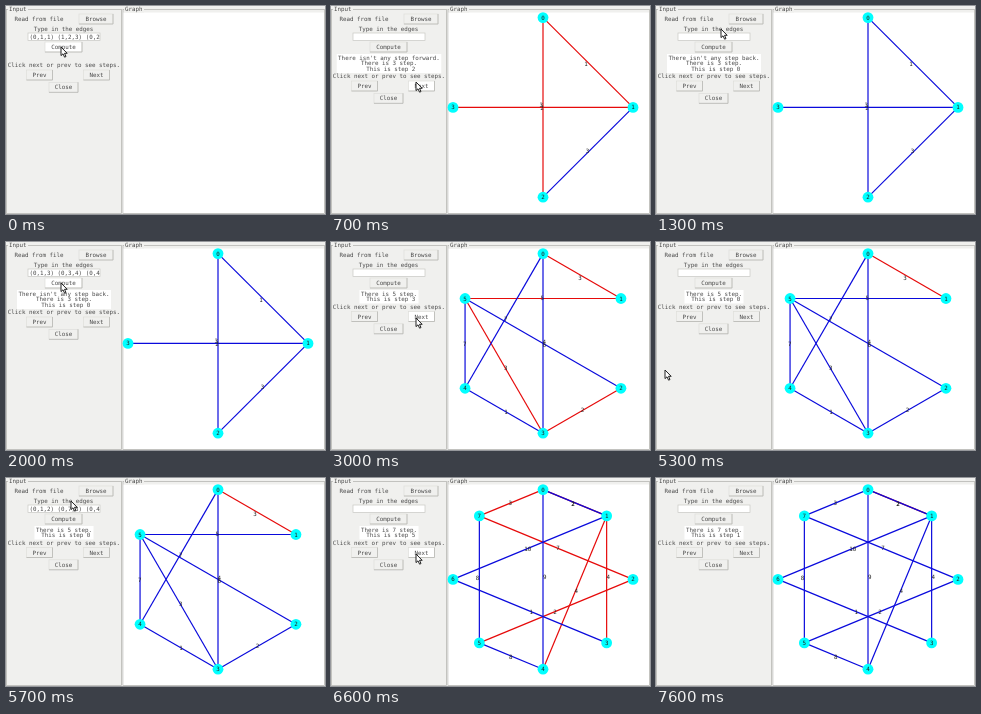
Write an HTML page that moves like this. It is 319 px wide and 208 px high and loops after 8100 ms.

```html
<!DOCTYPE html>
<html lang="en">
<head>
<meta charset="utf-8">
<title>Spanning tree steps</title>
<style>
html, body { margin: 0; width: 100%; height: 100%; overflow: hidden; background: #f0f0ee; }
svg { display: block; width: 319px; height: 208px; }
text { font: 5.83px "DejaVu Sans Mono", monospace; fill: #484848; text-anchor: middle; text-rendering: geometricPrecision; white-space: pre; }
.left { text-anchor: start; }
.graph text { fill: #222; }
</style>
</head>
<body>
<svg id="stage" viewBox="0 0 319 208"></svg>
<script>
const TICK = 100, TICKS = 81;
const stage = document.getElementById('stage');

// Edges as "from to : weight", those of the tree first, in step order.
// The last graph holds 0-1 twice, so its first step stays hidden.
const graphs = [
  { nodes: 4, steps: 3, typed: '(0,1,1) (1,2,3) (0,2', edges: '01:1 02:2 31:3 12:3' },
  { nodes: 6, steps: 5, typed: '(0,1,3) (0,3,4) (0,4',
    edges: '01:3 15:5 53:3 32:2 43:1 03:4 04:7 52:6 54:7' },
  { nodes: 8, steps: 7, typed: '(0,1,2) (0,7,3) (0,4',
    edges: '01:2 07:3 72:7 25:2 14:4 13:4 63:1 01:2 04:9 16:10 75:8 54:8' }
];

const spots = {
  compute: [55, 41], next: [85, 76], prev: [34, 76],
  entry: [65, 23], away: [9, 128], gone: [-30, 140]
};

// Where the pointer rests, from tick to tick, and how often it acts there.
const script = [
  ['compute', 0, 1, 1], ['next', 4, 7, 4], ['prev', 9, 12, 4],
  ['entry', 13, 18, 1], ['compute', 20, 21, 1], ['next', 24, 33, 6], ['prev', 36.5, 42, 6],
  ['next', 45, 46, 1], ['away', 53, 53, 0], ['gone', 55, 55, 0],
  ['entry', 57, 57, 1], ['compute', 58, 58, 1], ['next', 60.5, 68, 8], ['prev', 70.5, 75.5, 6],
  ['gone', 76, TICKS, 0]
];

const actions = {
  entry: s => { s.typed = graphs[s.graph + 1].typed; },
  compute: s => Object.assign(s, { graph: s.graph + 1, typed: '', red: 0, step: 0, note: '' }),
  next: s => {
    const more = s.red < graphs[s.graph].steps;
    s.note = more ? '' : "There isn't any step forward.";
    if (more) s.step = s.red++;
  },
  prev: s => {
    s.note = s.red ? '' : "There isn't any step back.";
    s.step = s.red = Math.max(0, s.red - 1);
  }
};

function stateAt(tick) {
  const state = { graph: -1, typed: graphs[0].typed, red: 0, step: 0, note: '' };
  for (const [spot, from, to, count] of script)
    for (let i = 0; i < count; i++) {
      const when = count > 1 ? from + (to - from) * i / (count - 1) : to;
      if (Math.ceil(when) <= tick) actions[spot](state);
    }
  return state;
}

function pointerAt(tick) {
  const i = script.findIndex(row => row[2] >= tick);
  const [spot, from] = script[i];
  if (tick >= from) return spots[spot];
  const [last, , left] = script[i - 1];
  const k = (tick - left) / (from - left);
  return spots[last].map((v, axis) => v + (spots[spot][axis] - v) * k);
}

const text = (x, y, s, left) => `<text x="${x}" y="${y + 2}"${left ? ' class="left"' : ''}>${s}</text>`;
const box = (x, y, w, h, fill, stroke = 'none') =>
  `<rect x="${x}" y="${y}" width="${w}" height="${h}" fill="${fill}" stroke="${stroke}" stroke-width=".7"/>`;

function button(label, cx, cy, w, [px, py]) {
  const x = cx - w / 2, y = cy - 5;
  const over = px > x && px < x + w && py > y && py < y + 10;
  return box(x, y, w, 10, over ? '#fff' : '#f0f0ee', '#dededa') +
    `<path d="M${x} ${y + 10}h${w}v-10" fill="none" stroke="#b8b8b4" stroke-width=".8"/>` +
    text(cx, cy, label);
}

function drawGraph({ nodes, edges }, red) {
  const points = Array.from({ length: nodes }, (_, i) => {
    const a = 2 * Math.PI * i / nodes;
    return [212 + 90 * Math.sin(a), 101.4 - 89.8 * Math.cos(a)];
  });
  let lines = '', labels = '';
  edges.split(' ').forEach((edge, i) => {
    const [ends, weight] = edge.split(':');
    const [[x1, y1], [x2, y2]] = [...ends].map(n => points[n]);
    const color = i < red ? '#e60a0a' : '#0a0adc';
    lines += `<path d="M${x1} ${y1}L${x2} ${y2}" stroke="${color}" stroke-width="1.2"/>`;
    // Weights sit loosely around the middle of their edge.
    labels += text((x1 + x2) / 2 + 2 * Math.sin(5 * ends), (y1 + y2) / 2 + 2 * Math.cos(7 * ends), weight);
  });
  const dots = points.map(([x, y], i) =>
    `<circle cx="${x}" cy="${y}" r="5.4" fill="#0ff"/>` + text(x, y, i)).join('');
  return `<g class="graph">${lines}${dots}${labels}</g>`;
}

function drawPanel({ typed, graph, step, note }, pointer) {
  const lines = graph < 0 ? [] : [`There is ${graphs[graph].steps} step.`, `This is step ${step}`];
  if (note) lines.unshift(note);
  const hintY = 59 + 5.5 * Math.max(0, lines.length - 1);
  const w = note ? note.length * 3.5 + 3 : 59;
  return text(33, 13, 'Read from file') + button('Browse', 90, 13, 34, pointer) +
    text(57.5, 23, 'Type in the edges') +
    box(22, 27, 72, 7.5, '#fff', '#c8c8c4') + text(23.5, 31, typed, true) +
    button('Compute', 57.5, 41, 37, pointer) +
    (lines.length ? box(58 - w / 2, 48, w, lines.length * 5.5 + 2.5, '#fff') : '') +
    lines.map((s, i) => text(s.startsWith('This') ? 59.7 : 58, 51.5 + 5.5 * i, s)).join('') +
    text(58, hintY, 'Click next or prev to see steps.') +
    button('Prev', 33.5, hintY + 10, 26, pointer) +
    button('Next', 90.5, hintY + 10, 26, pointer) +
    button('Close', 57.5, hintY + 22.3, 29, pointer);
}

const title = (x, s) => box(x - 1, 0, 20, 6.5, '#f0f0ee') + text(x, 3, s, true);
const frames = box(0, 0, 319, 208, '#f0f0ee') +
  box(.5, 3.5, 115, 204, 'none', '#b0b0ac') + box(117, 3.5, 201.5, 204, 'none', '#b0b0ac') +
  box(117.5, 6.5, 200.5, 200.5, '#fff') + title(3, 'Input') + title(119, 'Graph');

function draw(tick) {
  const state = stateAt(tick), pointer = pointerAt(tick);
  stage.innerHTML = frames + drawPanel(state, pointer) +
    (state.graph < 0 ? '' : drawGraph(graphs[state.graph], state.red)) +
    `<path transform="translate(${pointer})" d="M0 0V8.6L2 6.8L3.6 10.2L5 9.5L3.5 6.3H6.2Z"
      fill="#fff" stroke="#222" stroke-width="1"/>`;
}

let shown = -1;
function loop() {
  const tick = Math.floor(performance.now() / TICK) % TICKS;
  if (tick !== shown) draw(shown = tick);
  requestAnimationFrame(loop);
}
loop();
</script>
</body>
</html>
```
